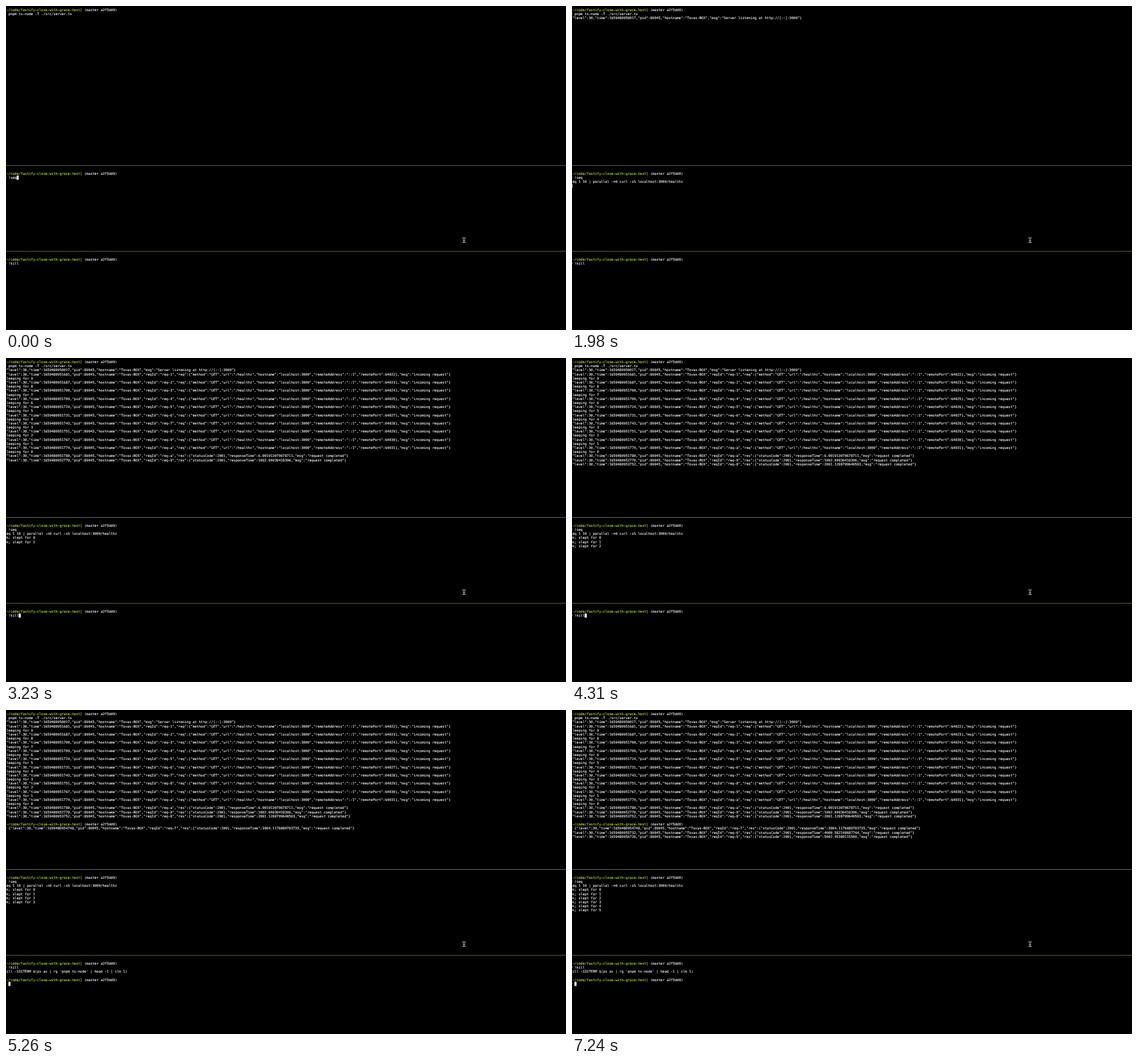
Animation of 983 by 570 pixels, one loop 8000 ms. Source, as an HTML page:

```html
<!DOCTYPE html>
<html lang="en">
<head>
<meta charset="utf-8">
<title>Graceful shutdown in three panes</title>
<style>
  html, body { margin: 0; width: 100%; height: 100%; overflow: hidden; background: #000; }
  svg { display: block; width: 983px; height: 570px; }
  text {
    font: 5.975px "DejaVu Sans Mono", monospace;
    font-variant-ligatures: none;
    text-rendering: geometricPrecision;
    white-space: pre;
    fill: #fff;
    stroke: #fff;
    stroke-width: .1px;
  }
  .path { fill: #c6ec2c; stroke: #c6ec2c; }
</style>
</head>
<body>
<svg id="stage" viewBox="0 0 983 570">
  <rect width="983" height="570" fill="#000"/>
  <g id="lines"></g>
  <rect id="rule1" y="280" width="983" height="1"/>
  <rect id="rule2" y="431" width="983" height="1"/>
  <rect id="cursor" fill="#fff"/>
  <g fill="none" stroke-linecap="round">
    <path id="beam" stroke="#b8b8b8" stroke-width="1.8"
      d="M801.9 407.9Q803.6 407.9 804 408.9Q804.4 407.9 806.1 407.9M804 408.9V415.1M801.9 416.1Q803.6 416.1 804 415.1Q804.4 416.1 806.1 416.1M803 412.8H805"/>
    <path stroke="#111" stroke-width=".6" d="M802 407.9Q803.6 407.9 804 408.9Q804.4 407.9 806 407.9M804 408.9V415.1M802 416.1Q803.6 416.1 804 415.1Q804.4 416.1 806 416.1"/>
  </g>
</svg>
<script>
const LOOP = 8000;
const CELL_W = 3.5973, CELL_H = 7.197, LEFT = -2.9, TOP = 3.3, BASE = 5.65;
const ACTIVE = '#66721a', IDLE = '#747474';
const $ = id => document.getElementById(id);
const items = [];

const colX = col => LEFT + col * CELL_W;
const rowY = row => TOP + row * CELL_H;

function put(at, row, str, col = 0, cls = '') {
  const el = document.createElementNS('http://www.w3.org/2000/svg', 'text');
  el.setAttribute('x', colX(col));
  el.setAttribute('y', rowY(row) + BASE);
  if (cls) el.setAttribute('class', cls);
  el.textContent = str;
  $('lines').append(el);
  items.push({ at, el });
}

function prompt(at, row, command = '') {
  const dir = '[~/code/fastify-close-with-grace-test]';
  put(at, row, dir, 0, 'path');
  put(at, row, '(master a2f5dd0)', dir.length + 1);
  put(at, row + 1, '# ' + command);
}

const log = (time, rest) =>
  `{"level":30,"time":1659480${time},"pid":89045,"hostname":"Tovas-BOX",${rest}}`;

const incoming = (time, id, port) => log(time,
  `"reqId":"req-${id}","req":{"method":"GET","url":"/healthz","hostname":"localhost:3000",` +
  `"remoteAddress":"::1","remotePort":${port}},"msg":"incoming request"`);

const completed = (time, id, took) => log(time,
  `"reqId":"req-${id}","res":{"statusCode":200},"responseTime":${took},"msg":"request completed"`);

// Top pane: server
prompt(0, 0, 'pnpm ts-node -T ./src/server.ts');
put(600, 2, log(950017, '"msg":"Server listening at http://[::]:3000"'));
[681, 687, 700, 709, 724, 731, 743, 751, 767, 774].forEach((ms, i) => {
  put(2310, 3 + 2 * i, incoming(951000 + ms, (i + 1).toString(16), 64022 + i));
  put(2310, 4 + 2 * i, 'sleeping for ' + (9 - i));
});
prompt(4670, 27);

// Each finished request also prints a reply in the middle pane
[
  [2310, 23, 951780, 'a', '6.001913070678711'],
  [3230, 24, 952770, '9', '1002.04030418396'],
  [4310, 25, 953752, '8', '2001.1288709640503'],
  [5260, 28, 954748, '7', '3004.1176080703735', 2],
  [6340, 29, 955732, '6', '4000.582248687744'],
  [7240, 30, 956726, '5', '5002.45380115509']
].forEach(([at, row, time, id, took, col], i) => {
  put(at, row, completed(time, id, took), col);
  put(at, 43 + i, 'ok; slept for ' + i);
});

// Middle pane: requests
prompt(0, 40, '!seq');
put(1980, 42, 'seq 1 10 | parallel -n0 curl -sS localhost:3000/healthz');

// Bottom pane: kill
prompt(0, 61, '!kill');
put(4490, 63, "kill -SIGTERM $(ps ax | rg 'pnpm ts-node' | head -1 | clm 1)");
prompt(4670, 65);

// Cursor stops: time, row, column
const stops = [[0, 41, 6], [1980, 43, 0], [2310, 44, 0], [2460, 62, 7], [4490, 64, 0], [4670, 66, 2]];
const cursor = $('cursor');
cursor.setAttribute('width', CELL_W);
cursor.setAttribute('height', CELL_H);
$('rule2').setAttribute('fill', ACTIVE);

function render(t) {
  for (const { at, el } of items) el.setAttribute('visibility', t >= at ? 'visible' : 'hidden');
  const [, row, col] = stops.filter(s => t >= s[0]).pop();
  cursor.setAttribute('x', colX(col));
  cursor.setAttribute('y', rowY(row));
  $('rule1').setAttribute('fill', t < 2460 ? ACTIVE : IDLE);
}

function tick() {
  render(performance.now() % LOOP);
  requestAnimationFrame(tick);
}
tick();
</script>
</body>
</html>
```
